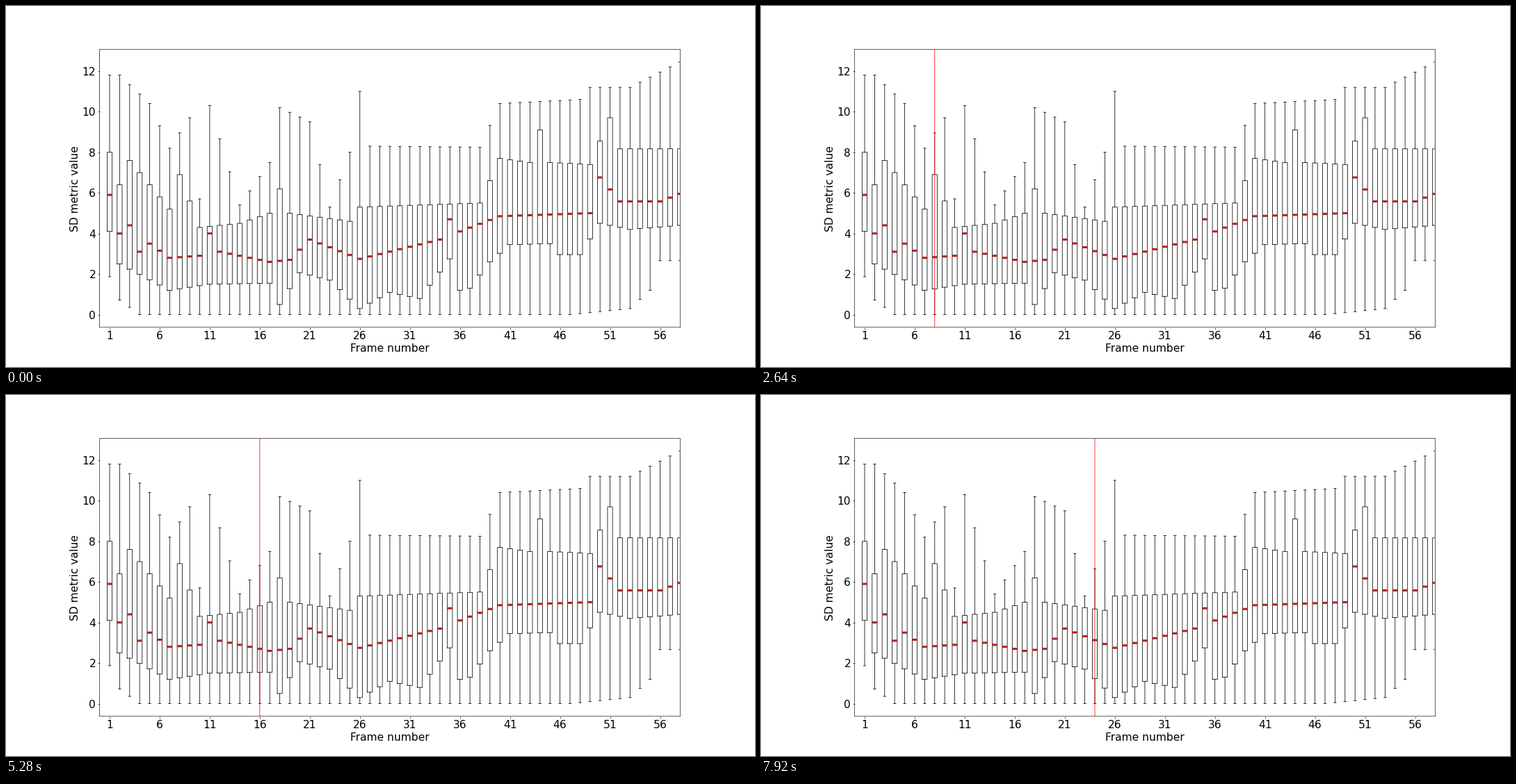
Animation of 1077 by 520 pixels, one loop 8000 ms. Source, as a matplotlib script:

```python
import numpy as np
import matplotlib.pyplot as plt
from matplotlib.animation import FuncAnimation

WIDTH, HEIGHT = 1077, 520
DPI = WIDTH / 19.2   # a 19.2 inch wide figure
LOOP_MS = 8000
TICK_MS = 20
STEP_MS = 330        # the cursor moves one box per step
COUNT = 58

plt.rcParams.update({
    "font.family": "DejaVu Sans",
    "font.size": 20,
    "path.simplify": False,
    "path.snap": False,
})

x = np.arange(1, COUNT + 1)


def trend(*points):
    """Value for every box, along straight lines between (box, value) points."""
    return np.interp(x, *zip(*points))


top = trend((1, 11.8), (2, 11.8), (5, 10.4), (7, 8.2), (9, 9.7), (10, 5.7),
            (11, 10.3), (14, 5.4), (17, 7.5), (18, 10.2), (21, 9.5),
            (23, 5.3), (25, 8), (26, 11), (27, 8.3), (38, 8.25), (40, 10.4),
            (48, 10.6), (49, 11.2), (53, 11.2), (58, 12.45))
q3 = trend((1, 8), (2, 6.4), (3, 7.6), (7, 5.2), (8, 6.9), (10, 4.3),
           (14, 4.5), (17, 5), (18, 6.2), (19, 5), (25, 4.6), (26, 5.3),
           (38, 5.5), (40, 7.7), (43, 7.5), (44, 9.1), (45, 7.5), (49, 7.4),
           (51, 9.7), (52, 8.17), (58, 8.17))
median = trend((1, 5.9), (2, 4), (3, 4.4), (4, 3.1), (5, 3.5), (7, 2.8),
               (10, 2.9), (11, 4), (12, 3.1), (17, 2.6), (19, 2.7),
               (21, 3.7), (26, 2.75), (34, 3.7), (35, 4.7), (36, 4.1),
               (40, 4.85), (49, 5), (50, 6.76), (52, 5.58), (56, 5.58),
               (58, 5.95))
q1 = trend((1, 4.1), (2, 2.5), (7, 1.2), (11, 1.5), (17, 1.55), (18, 0.5),
           (20, 2.07), (23, 1.7), (26, 0.3), (29, 1.1), (32, 0.8),
           (35, 2.75), (36, 1.2), (37, 1.3), (39, 2.6), (41, 3.45),
           (45, 3.5), (46, 2.96), (48, 2.96), (50, 4.5), (53, 4.2), (58, 4.4))
low = trend((1, 1.87), (2, 0.72), (4, 0), (47, 0), (53, 0.3), (55, 1.2),
            (56, 2.66), (58, 2.66))

fig = plt.figure(figsize=(WIDTH / DPI, HEIGHT / DPI), dpi=DPI,
                 facecolor="white")
ax = fig.add_axes([0.125, 0.11, 0.775, 0.77])


def strokes(xs, ys, **style):
    """Draw one polyline per box, all held in a single line artist."""
    gap = np.full(COUNT, np.nan)
    px = np.column_stack([*xs, gap]).ravel()
    py = np.column_stack([*ys, gap]).ravel()
    style = {"color": "black", "lw": 1, **style}
    ax.plot(px, py, **style)


left, right = x - 0.25, x + 0.25
cap_left, cap_right = x - 0.125, x + 0.125

strokes([left, right, right, left, left], [q1, q1, q3, q3, q1])
for inner, outer in ((q1, low), (q3, top)):
    strokes([x, x], [inner, outer])
    strokes([cap_left, cap_right], [outer, outer])
strokes([left, right], [median, median], color="firebrick", lw=4,
        solid_capstyle="butt", zorder=4)

ax.set_xlim(0, COUNT)
ax.set_ylim(-0.05 * top.max(), 1.05 * top.max())
ax.set_xticks(range(1, COUNT, 5))
ax.set_yticks(range(0, 13, 2))
ax.set_xlabel("Frame number")
ax.set_ylabel("SD metric value")

cursor = ax.axvline(0, color="red", lw=1, zorder=3, clip_on=False,
                    solid_capstyle="butt")


def update(i):
    # Sample mid-tick so each move lands on the nearest tick.
    step = (i * TICK_MS + TICK_MS // 2) // STEP_MS
    cursor.set_xdata([step, step])
    return (cursor,)


anim = FuncAnimation(fig, update, frames=LOOP_MS // TICK_MS,
                     interval=TICK_MS, repeat=True, repeat_delay=0,
                     blit=False)
plt.show()
```
